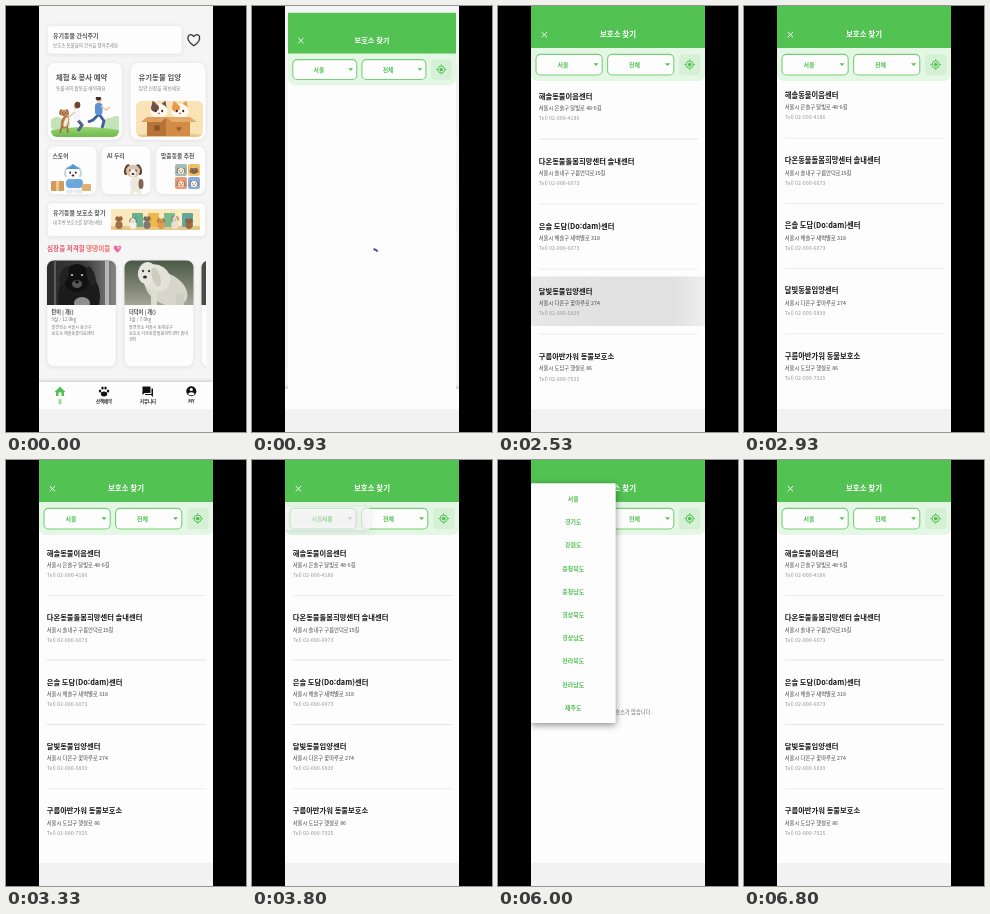
Animation of 240x426 px, one loop 8 s. Source, as an HTML page with a canvas:

```html
<!DOCTYPE html>
<html lang="ko">
<head>
<meta charset="utf-8">
<title>보호소 찾기</title>
<style>
html, body { margin: 0; width: 100%; height: 100%; overflow: hidden; background: #000; }
canvas { display: block; width: 240px; height: 426px; }
</style>
</head>
<body>
<canvas id="stage"></canvas>
<script>
const W = 240, H = 426, LOOP = 8000;
const L = 33, PW = 174, BOTTOM = 403, CX = 120, CY = BOTTOM / 2;
const GREEN = '#52c253', FONT = '"Noto Sans CJK KR", "Noto Sans CJK", "Noto Sans KR", sans-serif';
const canvas = document.getElementById('stage');
const g = canvas.getContext('2d');
const dpr = window.devicePixelRatio || 1;
canvas.width = W * dpr;
canvas.height = H * dpr;

const clamp = v => Math.max(0, Math.min(1, v));
const mix = (a, b, p) => a + (b - a) * p;
const smooth = p => p * p * (3 - 2 * p);

function keys(t, list) {
  if (t <= list[0][0]) return list[0][1];
  for (let i = 1; i < list.length; i++) {
    const [t0, a] = list[i - 1], [t1, b] = list[i];
    if (t < t1) return mix(a, b, smooth((t - t0) / (t1 - t0)));
  }
  return list[list.length - 1][1];
}

function bezier(x, x1, y1, x2, y2) {
  const at = (u, a, b) => 3 * (1 - u) ** 2 * u * a + 3 * (1 - u) * u * u * b + u ** 3;
  let lo = 0, hi = 1;
  for (let i = 0; i < 20; i++) {
    const m = (lo + hi) / 2;
    if (at(m, x1, x2) < x) lo = m; else hi = m;
  }
  return at(lo, y1, y2);
}

function zoomCurve(p) {
  const cut = 1 / 6;
  return p < cut
    ? 0.4 * bezier(p / cut, 0.05, 0, 0.1333, 0.06)
    : mix(0.4, 1, bezier((p - cut) / (1 - cut), 0.2083, 0.82, 0.25, 1));
}

// Drawing helpers
function layer(draw) { g.save(); draw(); g.restore(); }

function text(str, x, y, size, color, weight = 400, align = 'left') {
  layer(() => {
    g.translate(x, y + size * 0.37);
    g.scale(0.1, 0.1);
    g.font = `${weight} ${size * 10}px ${FONT}`;
    g.textAlign = align;
    g.fillStyle = color;
    g.fillText(str, 0, 0);
  });
}

function paint(fill, stroke, width = 1) {
  if (fill) { g.fillStyle = fill; g.fill(); }
  if (stroke) { g.strokeStyle = stroke; g.lineWidth = width; g.stroke(); }
}

function box(x, y, w, h, r, fill, stroke, width) {
  g.beginPath();
  g.roundRect(x, y, w, h, r);
  paint(fill, stroke, width);
}

function oval(x, y, rx, ry, fill, turn = 0) {
  g.beginPath();
  g.ellipse(x, y, rx, ry, turn, 0, 7);
  paint(fill);
}

function shape(pts, fill, stroke, width) {
  g.beginPath();
  for (let i = 0; i < pts.length; i += 2) g.lineTo(pts[i], pts[i + 1]);
  paint(fill, stroke, width);
}

function gradient(x0, y0, x1, y1, stops) {
  const fill = g.createLinearGradient(x0, y0, x1, y1);
  stops.forEach(([p, c]) => fill.addColorStop(p, c));
  return fill;
}

function shadow(color, blur, dy) {
  g.shadowColor = color;
  g.shadowBlur = blur * dpr;
  g.shadowOffsetY = dy * dpr;
}

function card(x, y, w, h, r) {
  layer(() => {
    shadow('rgba(0,0,0,.09)', 4, 0.8);
    box(x, y, w, h, r, '#fdfdfd');
  });
  box(x, y, w, h, r, null, '#e9e9e9', 0.6);
}

function clipBox(x, y, w, h, r, draw) {
  layer(() => {
    g.beginPath();
    g.roundRect(x, y, w, h, r);
    g.clip();
    draw();
  });
}

function heart(x, y, s, fill, stroke, width) {
  g.beginPath();
  g.moveTo(x, y + s * 0.95);
  g.bezierCurveTo(x - s * 1.7, y - s * 0.2, x - s * 0.8, y - s * 1.5, x, y - s * 0.6);
  g.bezierCurveTo(x + s * 0.8, y - s * 1.5, x + s * 1.7, y - s * 0.2, x, y + s * 0.95);
  g.closePath();
  paint(fill, stroke, width);
}

function face(x, y, r, fur, ear) {
  oval(x - r * 0.85, y - r * 0.2, r * 0.4, r * 0.8, ear, 0.3);
  oval(x + r * 0.85, y - r * 0.2, r * 0.4, r * 0.8, ear, -0.3);
  oval(x, y, r, r * 0.9, fur);
  oval(x - r * 0.4, y - r * 0.05, r * 0.13, r * 0.15, '#332a26');
  oval(x + r * 0.4, y - r * 0.05, r * 0.13, r * 0.15, '#332a26');
  oval(x, y + r * 0.35, r * 0.2, r * 0.15, '#332a26');
}

function cat(x, y, r, patch) {
  for (const s of [-1, 1]) shape([x + s * r, y - r * 0.2, x + s * r * 0.8, y - r * 1.3, x + s * r * 0.1, y - r * 0.7], patch);
  oval(x, y, r * 1.1, r * 0.9, '#fff8ee');
  oval(x - r * 0.5, y - r * 0.4, r * 0.5, r * 0.45, patch, -0.5);
  oval(x - r * 0.4, y, r * 0.13, r * 0.16, '#332a26');
  oval(x + r * 0.4, y, r * 0.13, r * 0.16, '#332a26');
  oval(x, y + r * 0.3, r * 0.16, r * 0.1, '#d97866');
}

// Home pictures
function walkPicture() {
  clipBox(45, 91, 68, 40, 6, () => {
    for (const [x, r] of [[51, 7], [59, 5], [103, 6], [110, 8]]) oval(x, 118, r, r, '#c4e3b8');
    oval(79, 134, 50, 13, gradient(0, 121, 0, 131, [[0, '#9ad36f'], [1, '#6dbb4e']]));
    // woman with a dog
    shape([71, 113, 76, 119, 72, 125], null, '#4c648e', 3);
    box(67, 103, 7, 12, 3, '#f3f4f6');
    shape([69, 106, 64, 110, 60, 108], null, '#f2c7a5', 1.6);
    oval(70, 100, 2.7, 3, '#f2c7a5');
    oval(71.5, 99, 2.8, 3.2, '#6b4434');
    oval(59, 116, 4, 7, '#b8794a', 0.3);
    oval(60, 116, 2, 5, '#f6e9d8', 0.3);
    face(58, 107, 3.7, '#c98b57', '#8c5734');
    shape([56, 120, 54, 127], null, '#a86c40', 1.8);
    shape([61, 120, 62, 127], null, '#a86c40', 1.8);
    // running man
    shape([93, 108, 87, 114, 82, 116], null, '#3c5f9c', 2.8);
    shape([93, 108, 98, 115, 96, 122], null, '#3c5f9c', 2.8);
    box(89, 97, 7.5, 12, 3, '#5b93d4');
    shape([95, 100, 100, 104, 104, 101], null, '#f2c7a5', 1.6);
    oval(93, 94, 2.6, 2.9, '#f2c7a5');
    oval(92.4, 92.5, 2.7, 2, '#3a302d');
  });
}

function boxPicture() {
  clipBox(130, 95, 67, 36, 6, () => {
    box(130, 95, 67, 36, 0, '#f9e2b6');
    oval(164, 130, 34, 3, '#e9c98f');
    cat(153, 105, 8, '#6d5148');
    cat(174, 105, 8, '#e79a4b');
    box(141, 111, 20, 19, 1, '#b87338');
    box(160, 111, 24, 19, 1, '#d28c46');
    shape([141, 111, 135, 116, 155, 116, 161, 111], '#dda05a');
    shape([184, 111, 191, 116, 166, 116, 160, 111], '#e5ac67');
    oval(151, 122, 3, 3, '#8f5528');
    heart(173, 123, 2.5, '#a15f2b');
  });
}

function smallPictures() {
  // delivery dog
  oval(68, 177, 9, 9, '#f4f6f8');
  box(60, 173, 17, 9, 4, '#6ba9dc');
  face(67, 167, 7, '#fbfbfb', '#cbd5df');
  shape([60, 163, 67, 158, 74, 163], '#5599d6');
  box(45, 175, 13, 10, 1, '#d39a5d');
  box(50, 175, 3, 10, 0, '#efc892');
  box(76, 178, 9, 7, 1, '#e1b171');
  oval(64, 185.5, 4, 2, '#e6eaee');
  oval(73, 185.5, 4, 2, '#e6eaee');
  // puppy
  oval(130, 178, 6, 8, '#eee7de');
  oval(135, 178, 2.5, 5, '#7d6653');
  face(127, 165, 7, '#d9c3aa', '#5f4636');
  oval(127, 167, 3, 4, '#f6efe7');
  oval(127, 168, 1.4, 1, '#2e2521');
  oval(126, 186, 2.4, 2, '#f1e8de');
  oval(133, 186, 2.4, 2, '#f1e8de');
  // four pets
  const tiles = [['#9dbfb8', '#f6e8d2'], ['#f0c169', '#8d6a55'], ['#ea9a7c', '#f5dcb5'], ['#86aeda', '#f8f4ee']];
  tiles.forEach(([back, fur], i) => {
    const x = 169 + i % 2 * 13, y = 158 + (i >> 1) * 13;
    box(x, y, 12, 12, 2, back);
    face(x + 6, y + 7, 3.4, fur, '#8a6450');
  });
}

function shelterPicture() {
  clipBox(105, 203, 89, 21, 1, () => {
    box(105, 203, 89, 21, 0, '#fbeac0');
    box(105, 220, 89, 4, 0, '#e6c88c');
    for (const [x, c] of [[126, '#69b08f'], [142, '#efb84b'], [158, '#7cba8d'], [176, '#5fa9a0']]) box(x, 207, 11, 14, 1, c);
    const furs = ['#a66f43', '#f6f0e6', '#81796f', '#e29a4c', '#ede0cf', '#9d6845'];
    furs.forEach((c, i) => {
      const x = 113 + i * 14;
      oval(x, 219, 3.6, 4, c);
      face(x, 213 + i % 2 * 2, 2.8, c, '#715342');
    });
  });
}

function darkPhoto() {
  box(41, 254, 69, 45, 0, gradient(41, 0, 110, 0, [[0, '#2a2a2a'], [0.55, '#3c3c3c'], [1, '#858585']]));
  box(48, 254, 2, 45, 0, '#5c5c5c');
  box(99, 254, 4, 45, 0, '#b5b5b5');
  oval(73, 291, 21, 27, '#1b1b1b');
  oval(71, 272, 13, 14, '#111');
  oval(58, 270, 4, 10, '#222', 0.3);
  oval(85, 270, 4, 10, '#222', -0.3);
  oval(66, 269, 1.3, 1, '#bbb');
  oval(76, 269, 1.3, 1, '#bbb');
  oval(71, 278, 5, 4, '#575757');
  oval(71, 276, 2, 1.4, '#0a0a0a');
  oval(76, 297, 8, 6, '#8f8f8f');
}

function palePhoto() {
  box(118, 254, 70, 45, 0, gradient(0, 254, 0, 299, [[0, '#4b5846'], [0.6, '#7d8372'], [1, '#a5a598']]));
  oval(160, 283, 23, 15, '#d6d6ca', 0.5);
  oval(150, 272, 15, 13, '#e2e2d8', 0.6);
  oval(141, 267, 9, 11, '#e8e7df', 0.2);
  oval(150, 271, 4, 10, '#cdccc0', -0.3);
  oval(137, 265, 1.2, 1.2, '#48473f');
  oval(143, 265, 1.2, 1.2, '#48473f');
  oval(139, 271, 2, 1.6, '#302f2b');
  box(145, 283, 6, 18, 3, '#deddd2');
  box(170, 287, 8, 14, 3, '#cfcec2');
}

function petCard(x, photo, lines) {
  card(x, 254.5, 69, 106, 7);
  clipBox(x, 254.5, 69, 44.5, [7, 7, 0, 0], photo);
  const rows = [[306, 5.2, 600], [313.5, 4.6, 400], [321, 4.15, 400], [327, 4.15, 400], [333, 4.15, 400]];
  lines.forEach((s, i) => text(s, x + 4.5, rows[i][0], rows[i][1], i ? '#777' : '#444', rows[i][2]));
}

function navBar() {
  layer(() => {
    shadow('rgba(0,0,0,.3)', 4, -0.5);
    box(L, 376, PW, 27, 0, '#fdfdfd');
  });
  shape([48.5, 386, 54, 380.5, 59.5, 386, 58, 386, 58, 390, 55.5, 390, 55.5, 386.5, 52.5, 386.5, 52.5, 390, 50, 390, 50, 386], GREEN);
  oval(98, 388, 3.2, 2.4, '#111');
  for (const [x, y] of [[94, 385], [96.5, 382], [99.5, 382], [102, 385]]) oval(x, y, 1.2, 1.5, '#111');
  box(136.5, 380.5, 8, 6.5, 0.7, '#111');
  shape([136.5, 386, 136.5, 389, 139, 386.5], '#111');
  shape([145.5, 382.5, 147, 382.5, 147, 391, 145, 389, 139, 389, 139, 388, 145.5, 388], '#111');
  oval(185.3, 385.3, 5, 5, '#111');
  oval(185.3, 383.5, 1.6, 1.6, '#fff');
  oval(185.3, 387.8, 3, 1.5, '#fff');
  text('홈', 54, 395, 4.4, GREEN, 600, 'center');
  text('산책예약', 98, 395, 4.4, '#222', 600, 'center');
  text('커뮤니티', 142, 395, 4.4, '#222', 600, 'center');
  text('MY', 185.3, 395, 4.4, '#222', 600, 'center');
}

function heading(title, note, x, y, size, noteY, noteSize) {
  text(title, x, y, size, '#555', 600);
  if (note) text(note, x, noteY, noteSize, '#808080', 500);
}

function home(t) {
  box(L, 0, PW, BOTTOM, 0, '#f5f5f5');
  card(41.3, 19.5, 134.7, 28.5, 4);
  heading('유기동물 간식주기', '보호소 동물들의 간식을 챙겨주세요', 47, 30, 6, 39, 4.5);
  heart(187.8, 34, 6, null, '#333', 1.3);

  card(41.3, 56.5, 75, 77.5, 8);
  heading('체험 & 봉사 예약', '동물과의 활동을 예약해요', 50, 71, 7.4, 82, 4.7);
  walkPicture();
  card(124.3, 56.5, 75.7, 77.5, 8);
  heading('유기동물 입양', '입양 신청을 해보세요', 132.5, 71, 7.4, 82, 4.8);
  boxPicture();

  for (const x of [41.3, 95.3, 149.8]) card(x, 140, 49.5, 48.5, 7);
  heading('스토어', '', 46.5, 150, 5.8);
  heading('AI 두리', '', 101, 150, 5.8);
  heading('맞춤동물 추천', '', 155, 150, 5.8);
  smallPictures();

  card(41.3, 197, 158.2, 33.5, 4);
  heading('유기동물 보호소 찾기', '내 주변 보호소를 찾아보세요', 47, 207, 6, 216.5, 4.25);
  shelterPicture();
  const tap = clamp((t - 715) / 200);
  if (tap > 0) clipBox(41.3, 197, 158.2, 33.5, 4, () => oval(110, 214, 10 + 90 * tap, 10 + 90 * tap, 'rgba(0,0,0,.09)'));

  text('심장을 저격할', 41, 243, 6.6, '#e6556f', 700);
  text('댕댕이들', 80, 243, 6.6, '#ee6f62', 700);
  heart(111.5, 243, 3.8, '#f0679f');
  heart(112.7, 242, 1.6, '#f9a7c8');

  layer(() => {
    g.beginPath();
    g.rect(L, 248, 167, 120);
    g.clip();
    petCard(41, darkPhoto, ['탄이 | 개()', '9살 / 12.0kg', '발견장소 서울시 용산구', '보호소 해솔동물이음센터']);
    petCard(118.5, palePhoto, ['더덕이 | 개()', '3살 / 7.0kg', '발견장소 서울시 동대문구', '보호소 다온동물돌봄희망센터 솔내', '센터']);
    petCard(195.5, () => box(195, 254, 10, 45, 0, '#4a4a46'), []);
  });
  navBar();
}

// Shelter page
const shelters = [
  ['해솔동물이음센터', '서울시 은솔구 달빛로 48-6길', '02-000-4186'],
  ['다온동물돌봄희망센터 솔내센터', '서울시 솔내구 구름언덕로15길', '02-000-6073'],
  ['은솔 도담(Do:dam)센터', '서울시 해솔구 새벽별로 318', '02-000-6073'],
  ['달빛동물입양센터', '서울시 다온구 꽃마루로 274', '02-000-5839'],
  ['구름아반가워 동물보호소', '서울시 도담구 햇살로 86', '02-000-7925']
];

function list(t) {
  const up = keys(t, [[2520, 0], [2530, 0.0097], [2700, 0.0143], [2900, 0.0135], [3320, 0]]);
  const down = keys(t, [[3380, 0], [3520, 0.0133], [3720, 0]]);
  const anchor = up ? BOTTOM : 77, s = 1 + up + down;
  layer(() => {
    g.beginPath();
    g.rect(L, 75, PW, BOTTOM - 75);
    g.clip();
    g.translate(0, anchor);
    g.scale(1, s);
    g.translate(0, -anchor);
    const press = keys(t, [[2520, 0], [2530, 1], [2620, 1], [2950, 0]]);
    if (press) {
      g.globalAlpha = press;
      box(L, 271.8, PW, 49, 0, gradient(L, 0, L + PW, 0, [[0, '#e7e7e7'], [0.4, '#e1e1e1'], [0.82, '#e1e1e1'], [1, '#eeeeee']]));
      g.globalAlpha = 1;
    }
    shelters.forEach(([name, place, phone], i) => {
      const y = 93 + i * 64.4;
      text(name, 40.7, y, 7.3, '#161616', 700);
      text(place, 40.7, y + 12.3, 5.3, '#444', 500);
      text('Tel) ' + phone, 40.7, y + 22.2, 5.35, '#999');
      if (i < 4) box(40.7, y + 42.2, 159.3, 0.9, 0, '#e6e6e6');
    });
  });
}

function spinner(age) {
  const start = -Math.PI / 2 + age * 0.0021;
  g.beginPath();
  g.arc(CX, 252, 7.7, start, start + Math.min(age * 0.007, 4.5));
  paint(null, '#3f4a9e', 1.9);
}

function field(x, label) {
  box(x, 48.4, 66.2, 20.6, 4.5, '#fdfdfd', '#78cf79', 1.1);
  text(label, x + 27, 58.6, 6, GREEN, 700, 'center');
  shape([x + 57.5, 57.3, x + 62.5, 57.3, x + 60, 60], GREEN);
}

function shelterPage(t) {
  // The sheet runs past the lower edge so that it still covers it while zoomed out.
  box(L, 0, PW, BOTTOM + 20, 0, '#fdfdfd');
  box(L, 41, PW, 34, [0, 0, 7, 7], '#e4f6e4');
  box(L, 0, PW, 42, 0, GREEN);
  shape([43.7, 26, 49.1, 31.4], null, '#fff', 0.95);
  shape([49.1, 26, 43.7, 31.4], null, '#fff', 0.95);
  text('보호소 찾기', CX, 28.4, 7.5, '#fff', 700, 'center');
  field(38, t >= 4400 && t < 6600 ? '충청남도' : '서울');
  field(109.6, '전체');
  box(181, 48, 21.5, 21.2, 4, '#d6f0d6');
  g.beginPath();
  g.arc(191.7, 58.6, 3.6, 0, 7);
  paint(null, GREEN, 1);
  oval(191.7, 58.6, 1.9, 1.9, GREEN);
  for (let i = 0; i < 4; i++) {
    const dx = Math.cos(i * Math.PI / 2), dy = Math.sin(i * Math.PI / 2);
    shape([191.7 + dx * 3.6, 58.6 + dy * 3.6, 191.7 + dx * 5.3, 58.6 + dy * 5.3], null, GREEN, 1);
  }

  if (t < 1190) spinner(t - 835);
  else if (t < 4400) list(t);
  else if (t < 4590) spinner(t - 4400);
  else if (t < 6600) text('해당 지역에 보호소가 없습니다.', CX, 252.3, 5.25, '#666', 400, 'center');
  else if (t < 6790) spinner(t - 6600);
  else list(t);
}

const regions = ['서울', '경기도', '강원도', '충청북도', '충청남도', '경상북도', '경상남도', '전라북도', '전라남도', '제주도'];

function menu(t, opened, closed, selected, top) {
  if (t < opened || t > closed + 75) return;
  const row = 23.2, pad = 3.9, height = regions.length * row + 2 * pad;
  const p = clamp((t - opened) / 300), grow = smooth(clamp((p - 0.25) / 0.25));
  const first = top + pad + selected * row;
  const y0 = mix(first, top, grow), y1 = mix(first + row, top + height, grow);
  const unit = 0.5 / (regions.length + 1.5);
  layer(() => {
    const alpha = clamp(Math.min(p / 0.25, 1 - (t - closed) / 75));
    g.globalAlpha = alpha;
    layer(() => {
      shadow(`rgba(0,0,0,${0.45 * alpha * alpha})`, 7, 2);
      box(L, y0, 84.7, y1 - y0, 1, '#fdfdfd');
    });
    clipBox(L, y0, 84.7, y1 - y0, 1, () => regions.forEach((name, i) => {
      const shown = i === selected ? 1 : clamp((p - 0.5 - (i + 1) * unit) / (1.5 * unit));
      g.globalAlpha = alpha * shown;
      text(name, 75.3, top + pad + (i + 0.5) * row, 6, GREEN, 700, 'center');
    }));
  });
}

function zoomed(s, draw) {
  layer(() => {
    g.translate(CX, CY);
    g.scale(s, s);
    g.translate(-CX, -CY);
    draw();
  });
}

function render(t) {
  g.setTransform(dpr, 0, 0, dpr, 0, 0);
  box(0, 0, W, H, 0, '#000');
  box(L, 0, PW, H, 0, '#f2f2f2');
  layer(() => {
    g.beginPath();
    g.rect(L, 0, PW, BOTTOM);
    g.clip();
    const p = clamp((t - 835) / 300), z = zoomCurve(p);
    if (p < 1) zoomed(mix(1, 1.05, z), () => home(t));
    if (p > 0) {
      g.globalAlpha = clamp((p - 0.125) / 0.125);
      zoomed(mix(0.85, 1, z), () => shelterPage(t));
      g.globalAlpha = 1;
    }
  });
  layer(() => {
    g.beginPath();
    g.rect(L, 0, PW, H);
    g.clip();
    menu(t, 3755, 4395, 0, 43);
    menu(t, 5690, 6595, 4, 23.3);
  });
}

function tick() {
  render(performance.now() % LOOP);
  requestAnimationFrame(tick);
}
tick();
</script>
</body>
</html>
```
